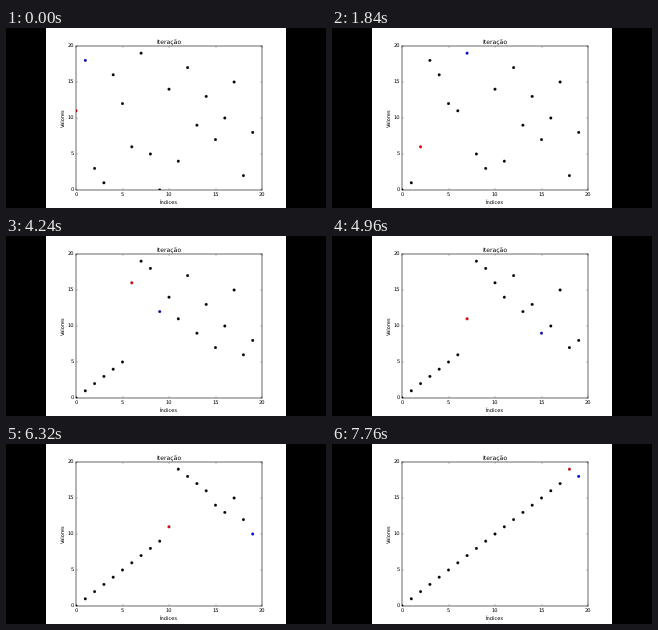
A matplotlib script for the animation above (7840 ms loop, 320 by 180 pixels).

```python
from itertools import combinations

import matplotlib.pyplot as plt
from matplotlib.animation import FuncAnimation
from matplotlib.patches import Rectangle

W, H, DPI = 320, 180, 30
FRAMES, INTERVAL = 98, 80
START = [11, 18, 3, 1, 16, 12, 6, 19, 5, 0, 14, 4, 17, 9, 13, 7, 10, 15, 2, 8]

plt.style.use("classic")
plt.rcParams.update({
    "font.family": "DejaVu Sans",
    "font.size": 12.25,
    "text.hinting": "none",
    "path.snap": False,
    "savefig.dpi": "figure",
    "savefig.facecolor": "auto",
    "toolbar": "None",
})


def exchange_sort(values):
    """List every comparison as (values before the swap, i, j)."""
    a, steps = list(values), []
    for i, j in combinations(range(len(a)), 2):
        steps.append((a[:], i, j))
        if a[j] < a[i]:
            a[i], a[j] = a[j], a[i]
    return steps


STEPS = exchange_sort(START)

fig = plt.figure(figsize=(W / DPI, H / DPI), dpi=DPI, facecolor="black")
fig.add_artist(Rectangle((40 / W, 0), 240 / W, 1, color="white", lw=0, zorder=-1))

ax = fig.add_axes([70 / W, 0.1, 186 / W, 0.8])
ax.set(xlim=(0, 20), ylim=(0, 20), xticks=range(0, 21, 5), yticks=range(0, 21, 5),
       title="Iteração", ylabel="Valores")
ax.set_xlabel("Índices", labelpad=7.5)
for spine in ax.spines.values():
    spine.set(linewidth=1.4, snap=False)

# A scatter keeps sub-pixel positions, unlike line markers
dots = ax.scatter(range(len(START)), START, s=40, c=["black"] * len(START),
                  edgecolors="black", linewidths=0.5, snap=False, zorder=2)


def update(k):
    # Short hold on the first pair, then two comparisons per frame
    a, i, j = STEPS[max(0, 2 * k - 5)]
    colors = ["black"] * len(a)
    colors[i], colors[j] = "red", "blue"
    dots.set_offsets(list(enumerate(a)))
    dots.set_facecolor(colors)
    return dots,


anim = FuncAnimation(fig, update, frames=FRAMES, interval=INTERVAL,
                     repeat=True, repeat_delay=0)
plt.show()
```
